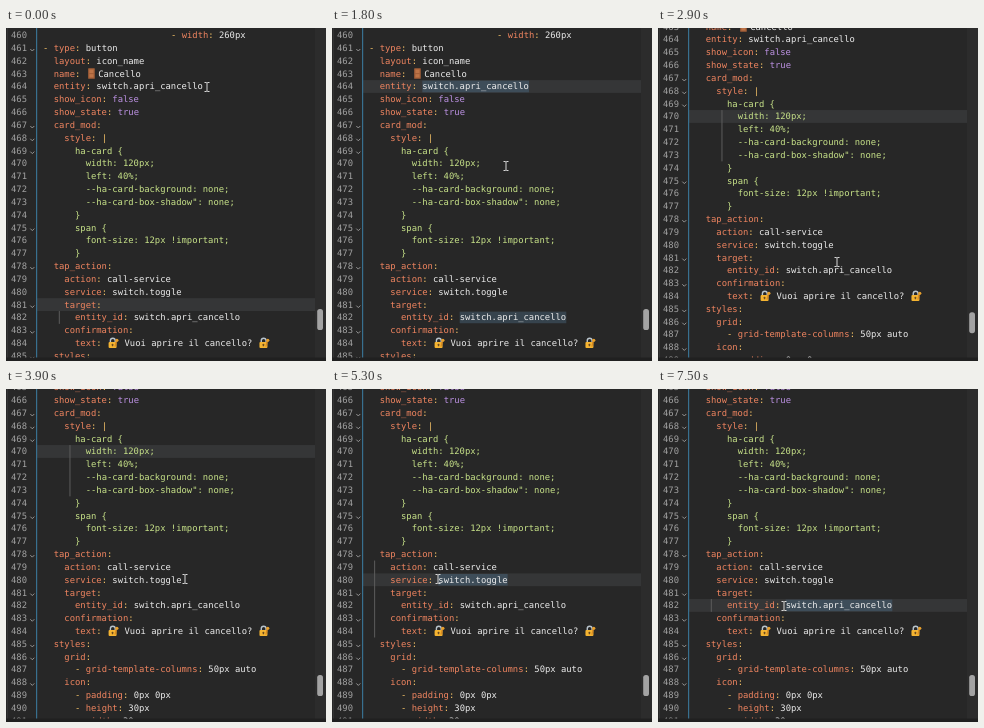
An HTML page for the animation above (8 s loop, 320 by 333 pixels).

```html
<!DOCTYPE html>
<html lang="it">
<head>
<meta charset="utf-8">
<title>YAML editor</title>
<style>
html, body { margin: 0; width: 100%; height: 100%; overflow: hidden; background: #272727; }
svg { display: block; width: 100vw; height: 100vh; }
text { font: 8.86px "DejaVu Sans Mono", monospace; white-space: pre; text-rendering: geometricPrecision; fill: #ececec; }
.num { fill: #a2a2a2; }
.key { fill: #f08560; }
.meta { fill: #f7c468; }
.bool { fill: #bd92e4; }
.str { fill: #c8e389; }
</style>
</head>
<body>
<svg id="stage" viewBox="0 0 320 333">
  <defs>
    <g id="door">
      <rect x="2.5" y="-5.4" width="6.6" height="10.4" rx=".5" fill="#a45f38"/>
      <rect x="3.8" y="-4" width="4" height="3.4" fill="#bd7447"/>
      <rect x="3.8" y=".5" width="4" height="3.2" fill="#bd7447"/>
    </g>
    <g id="lock">
      <path d="M3.4-.5V-2.5a2.4 2.4 0 0 1 4.8 0V-.5" fill="none" stroke="#b9c4cc" stroke-width="1.4"/>
      <rect x="1.6" y="-1.2" width="8" height="6.2" rx="1" fill="#f5b431"/>
      <path d="M9.8-3.6L8 3.6" stroke="#d98a22" stroke-width="1.3"/>
      <circle cx="9.9" cy="-2.8" r="1.6" fill="#e8a02c"/>
      <rect x="4.8" y=".6" width="1.5" height="2.6" rx=".6" fill="#6a4a20"/>
    </g>
  </defs>
  <rect width="320" height="333" fill="#272727"/>
  <g id="doc">
    <rect id="active" x="31" width="278" height="12.8" fill="#353637"/>
    <rect id="match" height="11.6" fill="#36434d"/>
    <rect id="sel" height="11.6" fill="#3e4d59"/>
    <rect id="guide" width="1" fill="#5c5c5c"/>
    <g id="rows"></g>
    <rect id="caret" width="1" height="10.6" fill="#e6e6e6"/>
  </g>
  <rect x="30" width="1.2" height="330" fill="#38708f"/>
  <rect x="1" width="1" height="330" fill="#343434"/>
  <rect x="309" width="11" height="333" fill="#2c2c2c"/>
  <rect id="thumb" x="311.2" width="5.8" height="21" rx="2.6" fill="#a3a3a3"/>
  <rect y="329.5" width="320" height="3.5" fill="#202020"/>
  <g id="mouse" fill="none">
    <path d="M-2.5-4.5H-.7L0-4L.7-4.5H2.5M0-4V4M-2.5 4.5H-.7L0 4L.7 4.5H2.5" stroke="#d8d8d8"/>
  </g>
</svg>
<script>
const FIRST = 460, PITCH = 12.83, CHAR = 5.333, LEFT = 37, LOOP = 8000;
const source = `                        - width: 260px
- type: button
  layout: icon_name
  name: 🚪 Cancello
  entity: switch.apri_cancello
  show_icon: false
  show_state: true
  card_mod:
    style: |
      ha-card {
        width: 120px;
        left: 40%;
        --ha-card-background: none;
        --ha-card-box-shadow": none;
      }
      span {
        font-size: 12px !important;
      }
  tap_action:
    action: call-service
    service: switch.toggle
    target:
      entity_id: switch.apri_cancello
    confirmation:
      text: 🔐 Vuoi aprire il cancello? 🔐
  styles:
    grid:
      - grid-template-columns: 50px auto
    icon:
      - padding: 0px 0px
      - height: 30px
      - width: 30px`.split("\n");
const folds = [461, 467, 468, 469, 475, 478, 481, 483, 485, 486, 488];
const emoji = { "🚪": ["door", 7.2], "🔐": ["lock", 12.2] };

const $ = id => document.getElementById(id);
const midY = n => 20 + (n - 461) * PITCH;
const colX = c => LEFT + c * CHAR;

function add(parent, tag, attrs, text) {
  const el = document.createElementNS("http://www.w3.org/2000/svg", tag);
  for (const k in attrs) el.setAttribute(k, attrs[k]);
  if (text) el.textContent = text;
  return parent.appendChild(el);
}

function set(id, attrs) {
  for (const k in attrs) $(id).setAttribute(k, attrs[k]);
}

// Splits a line into [text, class] pieces.
function tokens(line, n) {
  if (n >= 469 && n <= 477) return [[line, "str"]];
  const [, dash, key, value] = line.match(/^(- )?([\w-]+)(?::(.*))$/);
  const kind = /^ (true|false)$/.test(value) ? "bool" : value === " |" ? "meta" : "plain";
  return [[dash || "", "meta"], [key, "key"], [":", "meta"], [value, kind]];
}

function drawRow(raw, i) {
  const n = FIRST + i, y = midY(n), base = y + 2.9, rows = $("rows");
  add(rows, "text", { x: 5, y: base, class: "num" }, n);
  if (folds.includes(n))
    add(rows, "path", { d: `M24.3 ${y + 1}l2 2l2-2`, fill: "none", stroke: "#a2a2a2", "stroke-width": .9 });
  const line = raw.trimStart();
  let x = colX(raw.length - line.length);
  for (const [text, cls] of tokens(line, n))
    for (const part of text.split(/(🚪|🔐)/u)) {
      if (!part) continue;
      if (emoji[part]) {
        const [id, width] = emoji[part];
        add(rows, "use", { href: "#" + id, x, y });
        x += width;
      } else {
        add(rows, "text", { x, y: base, class: cls }, part);
        x += part.length * CHAR;
      }
    }
}
source.forEach(drawRow);

// Interpolates [time, ...values] keys.
function at(keys, t) {
  let i = keys.findIndex(k => k[0] > t);
  if (i < 0) return keys[keys.length - 1].slice(1);
  if (i === 0) return keys[0].slice(1);
  const a = keys[i - 1], b = keys[i], p = (t - a[0]) / (b[0] - a[0]);
  return a.slice(1).map((v, j) => v + (b[j + 1] - v) * p);
}

const mousePath = [
  [0, 201, 59], [200, 196, 58], [500, 111, 57], [700, 90, 58], [1000, 91, 59],
  [1800, 174, 138], [2000, 172, 128], [2100, 172, 128], [2300, 176, 165], [2500, 179, 234],
  [3200, 179, 234], [3900, 179, 190], [4200, 177, 190], [4900, 106, 190], [5300, 106, 190],
  [6000, 236, 216], [6200, 235, 217], [7000, 144, 217], [7499, 144, 217], [7500, 126, 217]
];
const scrollPath = [[2500, 0], [2600, 9.4], [2800, 34], [3100, 73]];

// Clicks: start time, active line, guide column and rows, selectable columns.
const clicks = [
  { t: 0, line: 481, guide: [3, 482, 482] },
  { t: 200, line: 464, from: 10, to: 30 },
  { t: 2100, line: 470, guide: [5, 470, 473], caret: 21 },
  { t: 4200, line: 480, guide: [1, 479, 484], from: 13, to: 26 },
  { t: 6200, line: 482, guide: [3, 482, 482], from: 17, to: 37 }
];

function mark(id, line, from, to) {
  set(id, { x: colX(from), y: midY(line) - 5.8, width: Math.max(0, to - from) * CHAR });
}

function draw(t) {
  const [mx, my] = at(mousePath, t), [scroll] = at(scrollPath, t);
  const index = clicks.findLastIndex(c => c.t <= t), c = clicks[index];
  const next = clicks[index + 1];

  set("doc", { transform: `translate(0 ${-scroll})` });
  set("thumb", { y: 281 + scroll * 5 / 73 });
  set("mouse", { transform: `translate(${mx} ${my})` });
  set("active", { y: midY(c.line) - 6.4 });

  const [col, top, end] = c.guide || [0, 0, -1];
  set("guide", { x: colX(col) - .2, y: midY(top) - 6.4, height: (end - top + 1) * PITCH });

  let from = 0, to = 0;
  if (c.to) {
    // The drag runs leftwards; its furthest point stays selected.
    let reach = mx;
    for (let s = c.t; s <= Math.min(t, next ? next.t : LOOP); s += 100)
      reach = Math.min(reach, at(mousePath, s)[0]);
    to = c.to;
    from = Math.min(to, Math.max(c.from, Math.round((reach - LEFT) / CHAR)));
  }
  mark("sel", c.line, from, to);
  const twin = c.line === 464 && to - from > 1;
  mark("match", 482, twin ? from + 7 : 0, twin ? to + 7 : 0);

  const lit = c.caret && (t - c.t) % 1200 < 600;
  set("caret", { x: colX(c.caret || 0), y: midY(c.line) - 5.3, opacity: lit ? 1 : 0 });
}

const start = performance.now();
function tick() {
  const t = (performance.now() - start) % LOOP;
  draw(Math.floor(t / 100) * 100);
  requestAnimationFrame(tick);
}
tick();
</script>
</body>
</html>
```
